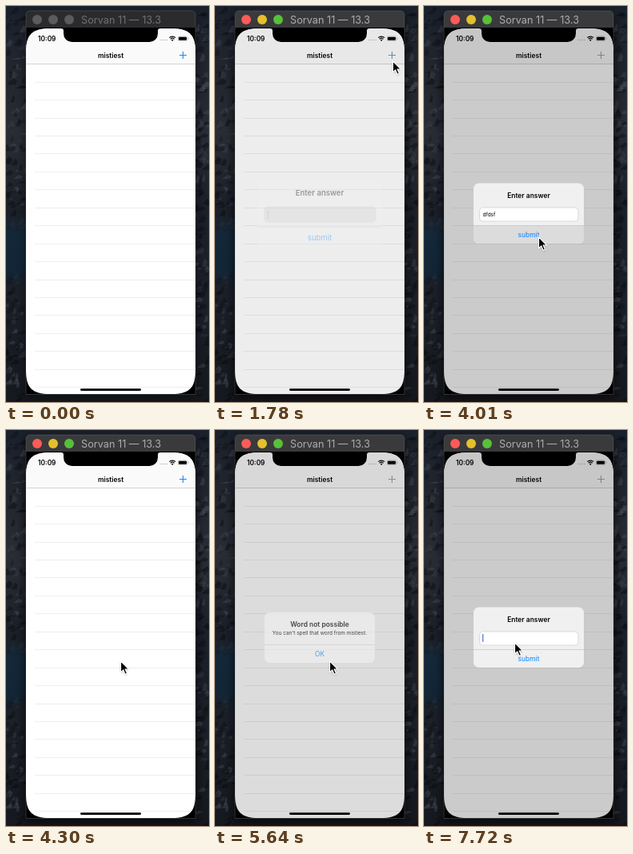
Animation of 254 by 495 pixels, one loop 8000 ms. Source, as an HTML page:

```html
<!DOCTYPE html>
<html lang="en">
<head>
<meta charset="utf-8">
<title>Word game</title>
<style>
  html, body { margin: 0; width: 100%; height: 100%; overflow: hidden; background: #171b23; }
  svg { display: block; width: 254px; height: 495px; font-family: Inter, Roboto, sans-serif; }
  .mid { text-anchor: middle; }
  .head { font-size: 8.45px; font-weight: 600; }
  .button { font-size: 8.45px; fill: #0a80ff; }
  .small { font-size: 6.45px; }
  #bar { fill: #2b2b2d; }
  #caption { fill: #707072; font-size: 12.7px; }
  #lights circle { fill: #5b5b5d; }
  #shadow { opacity: .35; }
  .active #bar { fill: #3a3a3c; }
  .active #caption { fill: #adadaf; }
  .active #lights .close { fill: #fc5b57; }
  .active #lights .hide { fill: #e5bf2d; }
  .active #lights .zoom { fill: #57c038; }
  .active #shadow { opacity: .6; }
</style>
</head>
<body>
<svg id="stage" viewBox="0 0 254 495">
  <defs>
    <linearGradient id="night" x2="0" y2="1">
      <stop offset="0" stop-color="#1b212c"/>
      <stop offset=".2" stop-color="#23272f"/>
      <stop offset=".32" stop-color="#2a2d35"/>
      <stop offset=".5" stop-color="#1b2029"/>
      <stop offset=".75" stop-color="#1c2028"/>
      <stop offset="1" stop-color="#15181e"/>
    </linearGradient>
    <linearGradient id="lake" x2="0" y2="1">
      <stop offset="0" stop-color="#14283a" stop-opacity="0"/>
      <stop offset=".3" stop-color="#14283a"/>
      <stop offset=".8" stop-color="#132535"/>
      <stop offset="1" stop-color="#132535" stop-opacity="0"/>
    </linearGradient>
    <filter id="blur" x="-20%" y="-20%" width="140%" height="140%"><feGaussianBlur stdDeviation="6"/></filter>
    <filter id="soft" x="-50%" y="-50%" width="200%" height="200%"><feGaussianBlur stdDeviation=".8"/></filter>
    <clipPath id="glass"><path id="outline"/></clipPath>
    <clipPath id="card"><rect x="62" y="221.5" width="138" height="75.5" rx="6.5"/></clipPath>
    <clipPath id="note"><rect x="62" y="228" width="138" height="63" rx="6.5"/></clipPath>
    <path id="arrow" d="M0 0V14.2L3.3 11.1 5.7 16.6 8.1 15.5 5.7 10.2H10.2Z"/>
  </defs>

  <rect width="254" height="495" fill="url(#night)"/>
  <g id="rocks"></g>
  <rect y="260" width="25" height="90" fill="url(#lake)"/>
  <rect id="shadow" x="23" y="9" width="216" height="482" rx="6" filter="url(#blur)"/>

  <!-- window -->
  <path id="bar" d="M25 28V11a5 5 0 0 1 5-5h202a5 5 0 0 1 5 5v17z"/>
  <rect x="25" y="27" width="212" height="458"/>
  <path d="M25 485.5V11a5 5 0 0 1 5-5h202a5 5 0 0 1 5 5v474.5z" fill="none" stroke="#77797c" stroke-opacity=".5" stroke-width=".7"/>
  <g id="lights">
    <circle class="close" cx="39" cy="17" r="6"/>
    <circle class="hide" cx="59" cy="17" r="6"/>
    <circle class="zoom" cx="79" cy="17" r="6"/>
  </g>
  <text id="caption" x="94" y="21.7">Sorvan 11 — 13.3</text>

  <!-- screen -->
  <g clip-path="url(#glass)">
    <rect x="25" y="28" width="212" height="457" fill="#fff"/>
    <rect x="25" y="28" width="212" height="44" fill="#fafafa"/>
    <rect x="25" y="72" width="212" height="1" fill="#d4d4d6"/>
    <g id="rows" fill="#eeeeef"></g>
    <text class="mid head" x="131" y="64.8">mistiest</text>
    <path id="plus" d="M217 61.5h9M221.5 57v9" stroke-width="1.1"/>
    <text x="40" y="44" font-size="8.3" font-weight="600">10:09</text>
    <g fill="#b8b8b8">
      <circle cx="193.2" cy="42.5" r=".8"/><circle cx="195.9" cy="42.5" r=".8"/>
      <circle cx="198.6" cy="42.5" r=".8"/><circle cx="201.3" cy="42.5" r=".8"/>
    </g>
    <g fill="none" stroke="#000" stroke-width="1.2">
      <path d="M204.3 39.7a5.5 5.5 0 0 1 7.8 0M205.8 41.4a3.4 3.4 0 0 1 4.8 0"/>
    </g>
    <path d="M208.2 43.9l-1.3-1.5a1.8 1.8 0 0 1 2.6 0z"/>
    <rect x="215.2" y="38" width="11.6" height="5.6" rx="1.5" fill="none" stroke="#b4b4b4" stroke-width=".6"/>
    <rect x="216" y="38.8" width="10" height="4" rx=".8"/>
    <rect x="227.5" y="39.9" width=".8" height="1.8" fill="#999"/>
    <rect id="dim" x="25" y="28" width="212" height="457"/>
  </g>
  <path d="M69 28q3 0 3 3v3.5a10.5 10.5 0 0 0 10.5 10.5h97a10.5 10.5 0 0 0 10.5-10.5v-3.5q0-3 3-3z"/>

  <!-- dialogs -->
  <g id="ask"><g clip-path="url(#card)">
    <rect x="62" y="221" width="138" height="76" fill="#f0f0f0"/>
    <rect id="submitDown" x="62" y="274" width="138" height="23" fill="#dcdcdc"/>
    <rect x="62" y="274" width="138" height=".8" fill="#c9c9cb"/>
    <text class="mid head" x="131" y="240">Enter answer</text>
    <rect id="field" x="69.5" y="252" width="123.5" height="17" rx="4" stroke="#d2d2d4" stroke-width=".8"/>
    <text id="answer" class="small" x="73.5" y="262.6"></text>
    <rect id="caret" y="255" width="1.1" height="10" fill="#4a5fd6"/>
    <text class="mid button" x="131" y="288.9">submit</text>
  </g></g>
  <g id="warn"><g clip-path="url(#note)">
    <rect x="62" y="228" width="138" height="63" fill="#f0f0f0"/>
    <rect id="okDown" x="62" y="268" width="138" height="23" fill="#dcdcdc"/>
    <rect x="62" y="268" width="138" height=".8" fill="#cfcfd1"/>
    <text class="mid head" x="131" y="245.9">Word not possible</text>
    <text class="mid small" x="131" y="256.2">You can't spell that word from mistiest.</text>
    <text class="mid button" x="131" y="283">OK</text>
  </g></g>

  <rect x="93" y="478.2" width="76" height="2.8" rx="1.4"/>
  <g id="cursor">
    <use href="#arrow" x=".5" y="1.8" opacity=".35" filter="url(#soft)"/>
    <use href="#arrow" x=".5" y=".8" stroke="#fff" stroke-width="1.2" stroke-linejoin="round"/>
  </g>
</svg>

<script>
  const LOOP = 8000, TICKS = 54, TICK = LOOP / TICKS;
  const $ = id => document.getElementById(id);
  const show = (id, on) => $(id).setAttribute('visibility', on ? 'inherit' : 'hidden');
  const within = (n, a, b) => n >= a && n <= b;

  // Key lists: [tick, value, ...], linear in between.
  const ASK = [[11, 0], [12, .35], [13, .85], [14, 1], [27, 1], [28, .4], [29, 0],
               [44, 0], [45, .35], [46, .85], [47, 1]];
  const WARN = [[30, 0], [31, .75], [32, .96], [33, 1], [37, 1], [38, .68], [39, .2], [40, 0]];
  const POINTER = [[7, 250, 130], [8, 238, 105], [9, 226, 78], [10, 222, 68], [12, 222, 68],
                   [13, 190, 130], [14, 134, 228], [15, 134, 264], [23, 136, 268], [24, 141, 282],
                   [25, 143, 288], [40, 143, 288], [41, 165, 220], [42, 196, 110], [43, 215, 64],
                   [44, 215, 62], [45, 215, 62], [46, 200, 100], [47, 165, 175], [48, 130, 240],
                   [49, 115, 262], [50, 113, 265]];

  function at(keys, n) {
    const i = keys.findIndex(k => k[0] >= n);
    if (i < 0) return keys[keys.length - 1].slice(1);
    if (i === 0) return keys[0].slice(1);
    const a = keys[i - 1], b = keys[i], f = (n - a[0]) / (b[0] - a[0]);
    return a.slice(1).map((v, j) => v + (b[j + 1] - v) * f);
  }

  function add(parent, tag, attrs) {
    const el = document.createElementNS('http://www.w3.org/2000/svg', tag);
    for (const k in attrs) el.setAttribute(k, attrs[k]);
    parent.append(el);
  }

  // Rectangle with continuous corners: e is their reach, c the handle's distance from the corner.
  function smoothRect(l, t, r, b, e, c) {
    return `M${l} ${t + e}C${l} ${t + c} ${l + c} ${t} ${l + e} ${t}H${r - e}` +
      `C${r - c} ${t} ${r} ${t + c} ${r} ${t + e}V${b - e}` +
      `C${r} ${b - c} ${r - c} ${b} ${r - e} ${b}H${l + e}` +
      `C${l + c} ${b} ${l} ${b - c} ${l} ${b - e}z`;
  }

  function build() {
    $('outline').setAttribute('d', smoothRect(25, 28.2, 237, 485, 30, 7.5));
    for (let k = 0; k < 18; k++)
      add($('rows'), 'rect', { x: 36, y: Math.floor(95.12 + 22.45 * k), width: 201, height: 1 });

    let seed = 11;
    const rand = () => (seed = seed * 16807 % 2147483647) / 2147483647;
    for (let i = 0; i < 260; i++) {
      const x = i % 2 ? 236 + rand() * 18 : rand() * 25, y = rand() * 495;
      const w = 2 + rand() * 7, h = 2 + rand() * 9;
      add($('rocks'), 'path', {
        d: `M${x - w} ${y + h}L${x} ${y}l${w * .6} ${h * .4}L${x + w * .3} ${y + h}z`,
        fill: rand() < .65 ? '#07090e' : '#4c515c',
        opacity: .2 + rand() * .3
      });
    }
  }

  // Dialogs shrink into place but fade out at full size.
  function dialog(id, keys, n) {
    const [p] = at(keys, n);
    const scale = p > at(keys, n - 1)[0] ? 1.2 - .2 * p : 1;
    $(id).setAttribute('opacity', p);
    $(id).setAttribute('transform', `translate(131 259.5) scale(${scale}) translate(-131 -259.5)`);
    return p;
  }

  function draw(n) {
    $('stage').classList.toggle('active', n >= 8);

    const asked = dialog('ask', ASK, n), p = Math.max(asked, dialog('warn', WARN, n));
    $('dim').setAttribute('opacity', p * .203);
    const tint = Math.min(1, p * 1.5);
    const mix = (a, b) => Math.round(a + (b - a) * tint);
    $('plus').setAttribute('stroke', `rgb(${mix(30, 165)},${mix(135, 165)},${mix(250, 168)})`);
    $('plus').setAttribute('opacity', within(n, 10, 11) || n === 44 ? .25 : 1);

    const typed = within(n, 17, 29) ? 'dfdsf'.slice(0, n - 16) : '';
    const light = Math.round(190 + 65 * asked);
    $('field').setAttribute('fill', `rgb(${light},${light},${light})`);
    $('answer').textContent = typed;
    $('caret').setAttribute('x', 73.2 + typed.length * 3.2);
    $('caret').setAttribute('opacity', asked);
    show('caret', within(n, 12, 21) || within(n, 45, 49) || n >= 52);
    show('submitDown', within(n, 26, 28));
    show('okDown', n === 37);

    show('cursor', n >= 7 && !within(n, 16, 22));
    $('cursor').setAttribute('transform', `translate(${at(POINTER, n).join(' ')})`);
  }

  let last = -1;
  function run() {
    const n = Math.floor((performance.now() % LOOP + 5) / TICK) % TICKS;
    if (n !== last) draw(last = n);
    requestAnimationFrame(run);
  }

  build();
  run();
</script>
</body>
</html>
```
